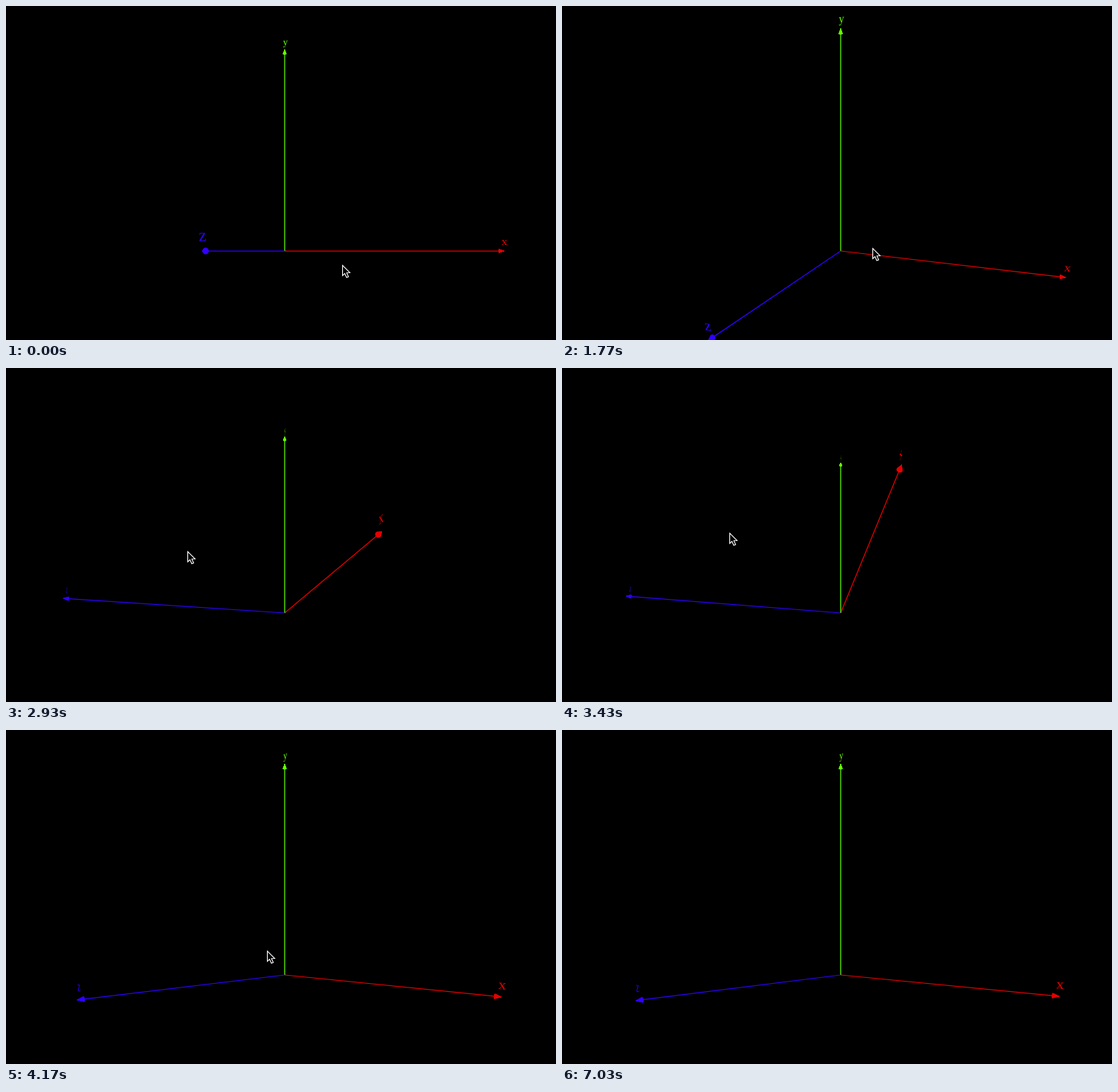
These frames come from a looping animation (746 px wide and 454 px high, 7.36 s). An HTML page with a canvas:

```html
<!DOCTYPE html>
<html>
<head>
<meta charset="utf-8">
<title>Orbiting axes</title>
<style>
  html, body { margin: 0; width: 100%; height: 100%; overflow: hidden; background: #000; }
  canvas { display: block; }
</style>
</head>
<body>
<canvas id="stage" width="746" height="454"></canvas>
<script>
const ctx = document.getElementById('stage').getContext('2d');
const LOOP = 7360, CURSOR_GONE = 5670;
const ORIGIN = [378, 333], SCALE = 275, PERSPECTIVE = 0.47;
const TIP = 0.996, CONE_BASE = 0.974, CONE_RADIUS = 0.009, EM = 0.048;

// Poses reached while dragging: time, azimuth, elevation in degrees
const POSES = [
  [800, 12.8, 0], [1200, 12.5, 10], [1440, 12.5, 10], [1770, 22.6, 16.4], [2330, 50, 12.7],
  [2930, 74.3, -13.6], [3430, 79.8, -26], [4170, 42.6, 6.35], [4430, 41.4, 6.35]
];

const AXES = [
  { name: 'x', dir: [1, 0, 0], label: [0.996, 0.026, 0], color: '#e60000' },
  { name: 'y', dir: [0, 1, 0], label: [0.004, 1.017, 0], color: '#66ff00' },
  { name: 'z', dir: [0, 0, 1], label: [-0.004, 0.027, 0.986], color: '#3200ff' }
];

function ease(t, from, to) {
  const s = Math.min(1, Math.max(0, (t - from) / (to - from)));
  return s * s * (3 - 2 * s);
}

// Harmonic mean of neighbouring slopes keeps the curve flat at holds and turns
function tangent(i, c) {
  if (i === 0 || i === POSES.length - 1) return 0;
  const slope = (p, q) => (q[c] - p[c]) / (q[0] - p[0]);
  const a = slope(POSES[i - 1], POSES[i]), b = slope(POSES[i], POSES[i + 1]);
  return a * b > 0 ? 2 * a * b / (a + b) : 0;
}

function poseAt(t, c) {
  const last = POSES.length - 1, next = POSES.findIndex(p => t < p[0]);
  if (next < 1) return POSES[next < 0 ? last : 0][c];
  const p = POSES[next - 1], q = POSES[next];
  const span = q[0] - p[0], s = (t - p[0]) / span, r = 1 - s;
  return r * r * (1 + 2 * s) * p[c] + s * s * (3 - 2 * s) * q[c]
    + span * s * r * (r * tangent(next - 1, c) - s * tangent(next, c));
}

function makeCamera(azimuth, elevation) {
  const a = azimuth * Math.PI / 180, e = elevation * Math.PI / 180;
  const sa = Math.sin(a), ca = Math.cos(a), se = Math.sin(e), ce = Math.cos(e);
  return ([x, y, z]) => {
    const ahead = x * sa + z * ca;
    const k = SCALE / (1 - PERSPECTIVE * (ahead * ce + y * se));
    return [ORIGIN[0] + k * (x * ca - z * sa), ORIGIN[1] - k * (y * ce - ahead * se)];
  };
}

function trace(points) {
  ctx.beginPath();
  points.forEach(p => ctx.lineTo(...p));
  ctx.closePath();
}

function drawCone([x, y, z], project) {
  const tip = project([x * TIP, y * TIP, z * TIP]), sides = 16;
  const rim = Array.from({ length: sides }, (_, i) => {
    const angle = i / sides * 2 * Math.PI;
    const u = CONE_RADIUS * Math.cos(angle), v = CONE_RADIUS * Math.sin(angle);
    return project([x * CONE_BASE + (y + z) * u, y * CONE_BASE + x * u + z * v, z * CONE_BASE + (x + y) * v]);
  });
  trace(rim);
  ctx.fill();
  rim.forEach((p, i) => {
    trace([tip, p, rim[(i + sides / 2 - 1) % sides]]);
    ctx.fill();
  });
}

// Labels are flat text lying parallel to the xy plane
function drawLabel({ name, label }, project) {
  const [x, y, z] = label, size = 100;
  const p = project(label), right = project([x + EM, y, z]), down = project([x, y - EM, z]);
  ctx.save();
  ctx.setTransform((right[0] - p[0]) / size, (right[1] - p[1]) / size,
    (down[0] - p[0]) / size, (down[1] - p[1]) / size, p[0], p[1]);
  ctx.font = size + 'px "Liberation Serif", serif';
  ctx.textAlign = 'center';
  ctx.fillText(name, 0, 0);
  ctx.restore();
}

function drawAxis(axis, project) {
  ctx.strokeStyle = ctx.fillStyle = axis.color;
  ctx.lineWidth = 1.25;
  ctx.beginPath();
  ctx.moveTo(...ORIGIN);
  ctx.lineTo(...project(axis.dir.map(v => v * CONE_BASE)));
  ctx.stroke();
  drawCone(axis.dir, project);
  drawLabel(axis, project);
}

// The pointer follows the drag, after gliding in and before gliding out
function drawCursor(t, azimuth, elevation) {
  const enter = 1 - ease(t, 30, 530), leave = ease(t, 5270, CURSOR_GONE);
  const x = 498 - 3.39 * azimuth + enter + 103 * leave;
  const y = 282.5 + 2.62 * elevation + 0.014 * elevation ** 2 + 69.5 * enter + 156 * leave;
  const arrow = [[0, 0], [0, 14], [3, 11.2], [5.5, 16.5], [8, 15.5], [5.6, 10.3], [10, 10]];
  trace(arrow.map(([dx, dy]) => [Math.round(x) + dx + 0.5, Math.round(y) + dy + 0.5]));
  ctx.fillStyle = '#000';
  ctx.fill();
  ctx.strokeStyle = '#fff';
  ctx.lineWidth = 1.1;
  ctx.stroke();
}

function render() {
  const t = performance.now() % LOOP;
  const azimuth = poseAt(t, 1), elevation = poseAt(t, 2);
  const project = makeCamera(azimuth, elevation);
  ctx.fillStyle = '#000';
  ctx.fillRect(0, 0, 746, 454);
  AXES.forEach(axis => drawAxis(axis, project));
  if (t < CURSOR_GONE) drawCursor(t, azimuth, elevation);
  requestAnimationFrame(render);
}
render();
</script>
</body>
</html>
```
